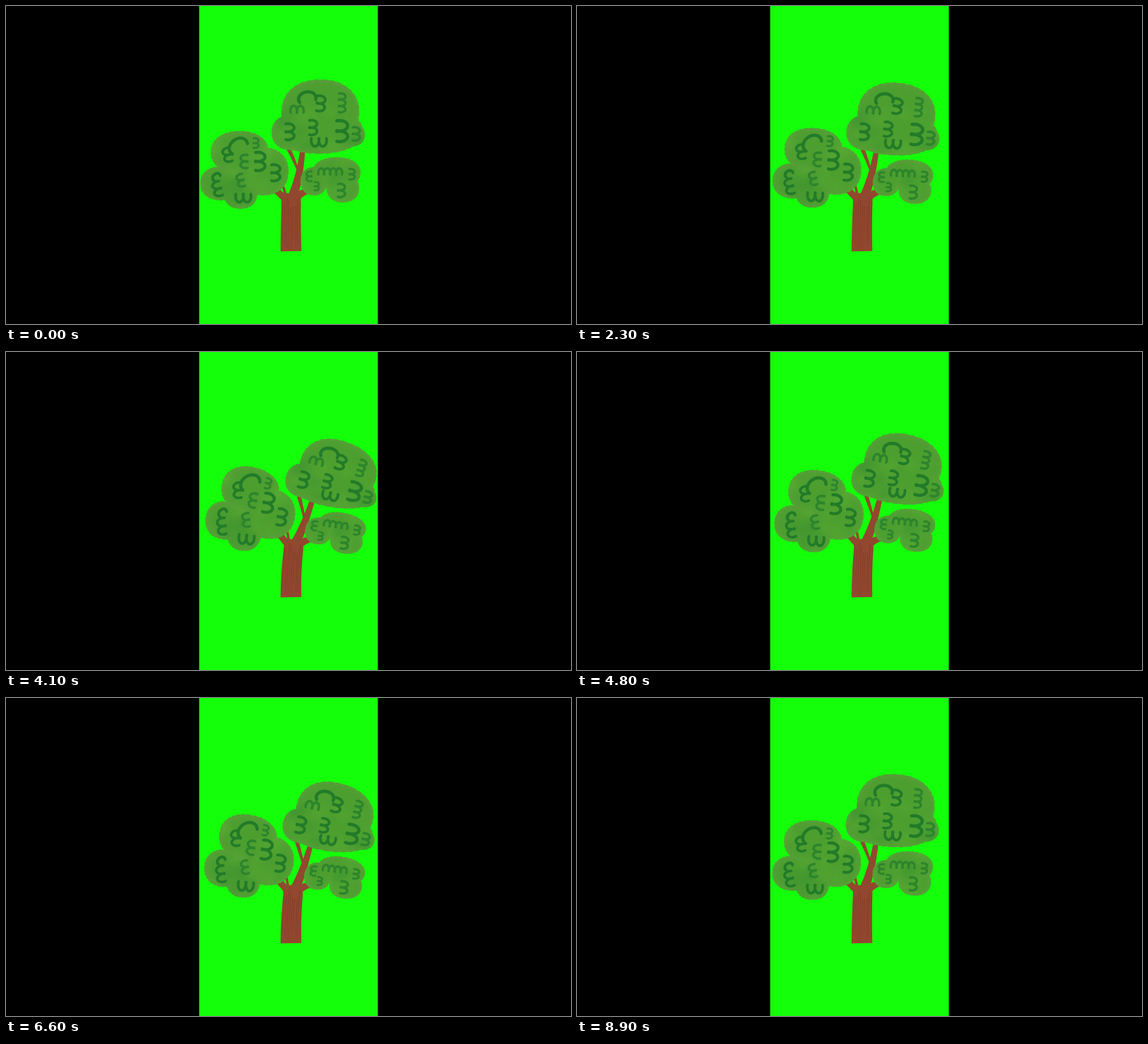
Recreate the animation shown at these times as an HTML page with a canvas. Size 800 by 450 pixels, loop 9 s.

```html
<!DOCTYPE html>
<html lang="en">
<head>
<meta charset="utf-8">
<title>Swaying tree</title>
<style>
  html, body { margin: 0; width: 100%; height: 100%; overflow: hidden; background: #000; }
  canvas { display: block; width: 800px; height: 450px; }
</style>
</head>
<body>
<canvas id="stage" width="800" height="450"></canvas>
<script>
const ctx = document.getElementById('stage').getContext('2d');
const LOOP = 9000, STEP = 100, SWAY = 2830, LEAD = 40, MAX_BEND = 0.00142;
const AXIS = 402, GROUND = 347;
const BARK = '#91482e', RIM = '#569e37', LEAF = '#4a9f2e';
const { sin, cos, PI } = Math;
let bend = 0;

const range = (n, f) => Array.from({ length: n }, (_, i) => f(i));

function rng(seed) {
  return () => (seed = (seed * 16807) % 2147483647) / 2147483647;
}

// The lean grows evenly with height, so the trunk follows an arc.
function warp([x, y]) {
  const h = GROUND - y, a = h * bend, side = x - AXIS;
  return [
    AXIS + h * a / 2 * (1 - a * a / 12) + side * cos(a),
    GROUND - h * cos(0.82 * a) + side * sin(a)
  ];
}

function addShape(path, pts, closed) {
  pts.forEach((p, i) => path[i ? 'lineTo' : 'moveTo'](...warp(p)));
  if (closed) path.closePath();
}

// A rounded clump with a slightly ragged brush edge.
function puff([x, y, rx, ry], inset) {
  const round = v => Math.sign(v) * Math.abs(v) ** 0.91;
  return range(90, i => {
    const a = i / 90 * 2 * PI, rag = 0.5 * sin(i * 2.3) - inset;
    return [x + (rx + rag) * round(cos(a)), y + (ry + rag) * round(sin(a))];
  });
}

// Scalloped brush mark: open arcs in a row, bulging towards the given angle.
function curl([x, y, size, angle = 0, bumps = 2]) {
  const a = angle * PI / 180, depth = size * Math.min(0.52, 1.04 / bumps);
  const pts = range(bumps * 15, k => {
    const phi = (k % 15 / 14 - 0.5) * 3.9;
    const along = size * ((Math.floor(k / 15) + 0.5 + 0.5 * sin(phi)) / bumps - 0.5);
    const out = depth * ((cos(phi) + 0.37) / 1.37 - 0.5);
    return [x + out * cos(a) - along * sin(a), y + out * sin(a) + along * cos(a)];
  });
  const width = Math.min(4.5, 1.3 + 0.23 * size / bumps);
  return { pts, width, color: width > 3.5 ? '#227b28' : '#2c852b' };
}

// Tapered wood along a quadratic curve.
function limb([x0, y0], [cx, cy], [x1, y1], w0, w1) {
  const edge = side => range(21, i => {
    const t = i / 20, s = 1 - t, w = side * (w0 * s + w1 * t) / 2;
    const dx = s * (cx - x0) + t * (x1 - cx), dy = s * (cy - y0) + t * (y1 - cy);
    const d = Math.hypot(dx, dy);
    return [
      s * s * x0 + 2 * s * t * cx + t * t * x1 - w * dy / d,
      s * s * y0 + 2 * s * t * cy + t * t * y1 + w * dx / d
    ];
  });
  return [...edge(1), ...edge(-1).reverse()];
}

function crown(seed, puffs, marks) {
  const rand = rng(seed);
  const blots = range(puffs.length * 5, i => {
    const [x, y, rx, ry] = puffs[i % puffs.length];
    return {
      at: [x + rx * (2 * rand() - 1), y + ry * (2 * rand() - 1)],
      r: 9 + 13 * rand(),
      rgb: i % 2 ? '60,146,46' : '90,174,50'
    };
  });
  return { puffs, blots, marks: marks.map(curl) };
}

const crowns = [
  crown(71,
    [[331, 207, 41, 30], [304, 251, 29, 24], [364, 234, 36, 34], [332, 265, 24, 22]],
    [[327, 196, 28, -125, 1], [313, 211, 20, 165], [354, 194, 14], [337, 220, 19, 180],
     [360, 220, 26], [382, 236, 23], [297, 241, 12, -130, 1], [299, 259, 21, 165],
     [332, 247, 18, 165], [336, 272, 22, 90]]),
  crown(193,
    [[436, 248, 19, 20], [468, 236, 34, 22], [477, 258, 23, 20]],
    [[429, 241, 14, 180], [459, 234, 34, -90, 4], [490, 238, 15], [475, 261, 19], [440, 255, 12]]),
  crown(417,
    [[445, 150, 55, 46], [404, 179, 28, 25], [443, 177, 62, 32], [488, 182, 20, 17]],
    [[426, 128, 25, -100, 1], [446, 138, 22, 5], [412, 146, 19, -90], [476, 137, 27, 0, 3],
     [402, 178, 23], [435, 172, 21], [443, 193, 22, 90], [476, 177, 30], [496, 181, 19]])
];

const wood = [
  limb([403.5, 347], [403, 310], [404, 265], 29.5, 27),
  limb([404, 274], [416, 245], [420, 203], 14, 7),
  limb([414, 234], [407, 216], [399, 200], 3, 6),
  limb([397, 276], [389, 266], [379, 258], 9, 9),
  limb([397, 272], [394, 260], [390, 247], 4, 3),
  limb([409, 274], [415, 265], [429, 261], 12, 8)
];

const rand = rng(29);
const grain = range(9, i => {
  const x = 391.5 + i * 3 + rand(), lean = (i - 4) * 0.2;
  return limb([x, 345 - 14 * rand()], [x + 2 * rand() - 1, 310], [x + lean, 270 + 14 * rand()], 0.6, 1.2);
});

function fillShapes(shapes, color) {
  const path = new Path2D();
  shapes.forEach(pts => addShape(path, pts, true));
  ctx.fillStyle = color;
  ctx.fill(path);
  return path;
}

function drawWood() {
  fillShapes(wood, BARK);
  ctx.globalAlpha = 0.45;
  fillShapes(grain, '#74331f');
  ctx.globalAlpha = 1;
}

function drawCrown({ puffs, blots, marks }) {
  const layer = (inset, color) => fillShapes(puffs.map(p => puff(p, inset)), color);
  ctx.save();
  ctx.clip(layer(0, RIM));
  ctx.globalAlpha = 0.35;
  for (let inset = 3; inset < 13; inset += 2) layer(inset, LEAF);
  ctx.globalAlpha = 1;
  for (const { at, r, rgb } of blots) {
    const [x, y] = warp(at);
    const glow = ctx.createRadialGradient(x, y, 0, x, y, r);
    glow.addColorStop(0, `rgba(${rgb},.35)`);
    glow.addColorStop(1, `rgba(${rgb},0)`);
    ctx.fillStyle = glow;
    ctx.fillRect(x - r, y - r, 2 * r, 2 * r);
  }
  ctx.restore();
  for (const { pts, width, color } of marks) {
    const path = new Path2D();
    addShape(path, pts);
    ctx.strokeStyle = color;
    ctx.lineWidth = width;
    ctx.stroke(path);
  }
}

function draw(time) {
  const t = Math.floor(time % LOOP / STEP) * STEP + LEAD;
  bend = MAX_BEND * (1 - cos(2 * PI * t / SWAY)) / 2;
  ctx.fillStyle = '#000';
  ctx.fillRect(0, 0, 800, 450);
  ctx.save();
  ctx.beginPath();
  ctx.rect(273.5, 0, 253, 450);
  ctx.clip();
  ctx.fillStyle = '#14ff0a';
  ctx.fillRect(273, 0, 254, 450);
  ctx.lineCap = ctx.lineJoin = 'round';
  drawWood();
  crowns.forEach(drawCrown);
  ctx.restore();
}

const start = performance.now();
function tick() {
  draw(performance.now() - start);
  requestAnimationFrame(tick);
}
tick();
</script>
</body>
</html>
```
